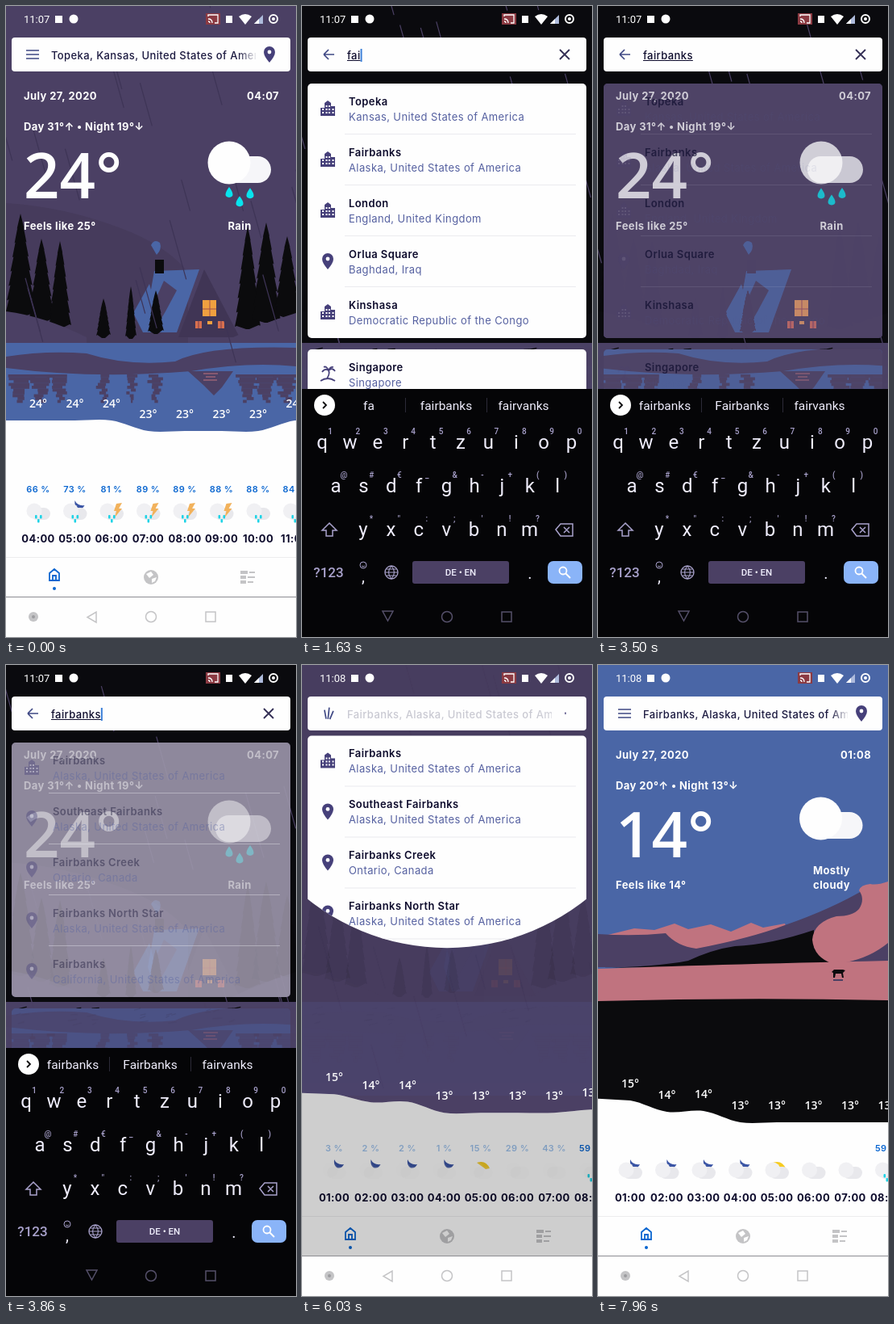
These frames come from a looping animation (360x781 px, 8000 ms). An HTML page with a canvas:

```html
<!DOCTYPE html>
<html lang="en">
<head>
<meta charset="utf-8">
<title>Weather search</title>
<style>
html, body { margin: 0; width: 100%; height: 100%; overflow: hidden; background: #4b4064; }
canvas { display: block; }
</style>
</head>
<body>
<canvas width="360" height="781"></canvas>
<script>
const c = document.querySelector('canvas').getContext('2d');
const PURPLE = '#4b4064', BLUE = '#4a66a6', PINK = '#c0737f', BLACK = '#0b0b0d', WHITE = '#fefefe';
const INK = '#0d0b2c', ICON = '#46407a', GREY = '#c4c4c6', ACCENT = '#0a66d0';
const LOOP = 8000, WORD = 'fairbanks', USA = 'United States of America';

const sat = v => Math.max(0, Math.min(1, v));
const ramp = (t, start, length) => sat((t - start) / length);
const smooth = p => p * p * (3 - 2 * p);
const mix = (a, b, p) => a + (b - a) * p;
const random = i => { const v = Math.sin(i * 91.7 + 3.1) * 43758.5; return v - Math.floor(v); };

function text(s, x, y, size = 13, color = WHITE, weight = 400, align = 'left', family = 'Inter') {
  c.font = `${weight} ${size}px ${family}, sans-serif`;
  c.letterSpacing = family === 'Inter' ? '0.4px' : '0px';
  c.textAlign = align;
  c.fillStyle = color;
  c.fillText(s, x, y + size * 0.36);
}
function box(x, y, w, h, color, r = 0) {
  c.fillStyle = color;
  c.beginPath();
  c.roundRect(x, y, w, h, r);
  c.fill();
}
function disc(x, y, r, color) {
  c.fillStyle = color;
  c.beginPath();
  c.arc(x, y, r, 0, 7);
  c.fill();
}
function shape(d, color) { c.fillStyle = color; c.fill(new Path2D(d)); }
function stroke(d, color, w = 1.5) { c.strokeStyle = color; c.lineWidth = w; c.stroke(new Path2D(d)); }
function ring(x, y, r, color, w = 1.5) {
  stroke(`M${x - r} ${y}a${r} ${r} 0 1 0 ${2 * r} 0a${r} ${r} 0 1 0 ${-2 * r} 0`, color, w);
}
function fade(alpha, draw) {
  if (alpha <= 0) return;
  c.save();
  c.globalAlpha *= alpha;
  draw();
  c.restore();
}
function at(x, y, scale, draw) {
  if (scale <= 0) return;
  c.save();
  c.translate(x, y);
  c.scale(scale, scale);
  draw();
  c.restore();
}

// Scenery
const trees = [[18, 257, 385, 19], [44, 288, 392, 16], [67, 291, 399, 14], [121, 362, 411, 9], [155, 347, 412, 7],
  [186, 352, 406, 10], [300, 273, 400, 16], [323, 268, 392, 18], [349, 285, 386, 16]];
function tree(x, top, base, half) {
  const steps = 7, side = [];
  for (let i = 1; i <= steps; i++) {
    const y = mix(top, base - 4, i / steps), w = half * (i / steps) ** 0.75;
    side.push([w, y], [w * 0.85, y - 1]);
  }
  const right = side.map(([w, y]) => `L${x + w} ${y}`).join('');
  const left = side.reverse().map(([w, y]) => `L${x - w} ${y + 1}`).join('');
  shape(`M${x} ${top}${right}L${x + 2} ${base}H${x - 2}${left}Z`, BLACK);
}
function lake() {
  box(0, 417, 360, 116, BLUE);
  shape('M0 434Q50 426 100 430Q150 446 210 440Q250 420 360 423V446Q300 440 230 452Q110 462 0 448Z', PURPLE);
  trees.forEach(([x, , , half], n) => {
    for (let i = 0; i < 10; i++) {
      const w = half * (1.9 - i * 0.16) * (0.6 + 0.5 * random(n * 10 + i));
      box(x - w / 2 + 8 * random(n + i * 7) - 4, 456 + i * 3.5, w, 3.8, PURPLE);
    }
  });
  shape('M226 452H282L268 472L258 482L246 470Z', PURPLE);
  stroke('M245 455H263M248 459H260M245 463H262', PINK, 1);
}
function cabinScene() {
  shape('M0 244Q70 248 140 274Q200 296 226 330V417H0Z', '#463b5c');
  shape('M184 328L240 326L212 404H186L176 374Z', BLUE);
  shape('M178 344L158 380L170 404H182L184 366Z', BLUE);
  shape('M196 340L212 352L198 378L184 402L180 376Z', PURPLE);
  shape('M180 296Q184 288 191 293Q194 301 187 308Z', BLUE);
  box(185, 314, 11, 17, BLACK);
  shape('M246 326L290 410H214Z', '#403555');
  box(244, 364, 17, 20, '#f0a040');
  stroke('M253 364V384M244 375H261', '#a0504c', 1);
  box(235, 390, 8, 9, '#d8704e');
  box(263, 390, 8, 9, '#d8704e');
  stroke('M239 390V399M267 390V399', '#7a3c50', 1);
  box(250, 390, 6, 4, '#f0a040');
  trees.forEach(tr => tree(...tr));
  shape('M0 378Q48 384 100 410V417H0ZM360 380Q320 392 280 411V417H360Z', PURPLE);
  lake();
}
function duneScene() {
  box(0, 0, 360, 600, BLUE);
  shape('M0 337L45 326L70 328L95 320L112 327L140 321L165 330L190 319L205 325L232 320L250 372H0Z', PINK);
  shape('M0 333Q45 336 84 332Q98 348 122 351Q190 338 232 322Q290 302 334 276V374H0Z', PURPLE);
  shape('M0 375Q70 374 112 366Q142 352 170 348Q215 346 268 328V350L292 372Z', BLACK);
  shape('M360 268Q346 273 338 271Q326 272 324 279Q332 290 324 302Q316 311 296 311Q268 318 266 340Q268 362 292 370H360Z', PINK);
  shape('M308 368Q338 362 360 344V368Z', PURPLE);
  shape('M0 376Q130 371 360 366V420H0Z', PINK);
  shape('M0 416Q180 411 360 415V600H0Z', BLACK);
  shape('M290 380L293 377H304L307 378L304 381L305 387H303L302 382H295L294 387H292V381Z', BLACK);
  stroke('M292 390H304', PURPLE, 2);
}
function rain(t, color) {
  for (let i = 0; i < 26; i++) {
    const length = 35 + 50 * random(i + 50);
    const y = (random(i) * 620 + t * (0.3 + 0.15 * random(i + 9))) % 620 - 100;
    const x = random(i + 90) * 440 - 110 + y * 0.28;
    stroke(`M${x} ${y}l${length * 0.28} ${length}`, color, 1.2);
  }
}

// Current weather
function bigCloud(x, y) {
  box(x - 17, y - 8, 69, 33, '#f6f6f9', 16.5);
  disc(x, y, 26.5, WHITE);
}
function header(t, arrived) {
  const bold = (s, x, y, align) => text(s, x, y, 13, WHITE, 700, align);
  bold('July 27, 2020', 22, 111);
  bold(arrived ? '01:08' : '04:07', 339, 111, 'right');
  bold(arrived ? 'Day 20°↑ • Night 13°↓' : 'Day 31°↑ • Night 19°↓', 22, 149);
  text(arrived ? '14°' : '24°', 22, 210, 78, WHITE, 600, 'left', 'Open Sans');
  bold(arrived ? 'Feels like 14°' : 'Feels like 25°', 22, 272);
  const sway = Math.sin(t / 900);
  if (arrived) {
    bigCloud(276 + sway, 190);
    bold('Mostly', 290, 254, 'center');
    bold('cloudy', 290, 272, 'center');
  } else {
    bigCloud(277, 194);
    [[277, 231], [303, 231], [290, 241]].forEach(([x, y], i) => {
      const dy = y + 1.5 * Math.sin(t / 250 + i);
      shape(`M${x} ${dy - 7}Q${x + 9} ${dy + 5} ${x} ${dy + 6}Q${x - 9} ${dy + 5} ${x} ${dy - 7}Z`, '#08e4ee');
    });
    bold('Rain', 290, 272, 'center');
  }
}

// Hourly forecast
const before = {
  hour: 4, temps: [24, 24, 24, 23, 23, 23, 23, 24], y: [492, 492, 492, 505, 505, 505, 505, 492],
  chance: [66, 73, 81, 89, 89, 88, 88, 84], kind: 'rmttttrt'
};
const after = {
  hour: 1, temps: [15, 14, 14, 13, 13, 13, 13, 13], y: [518, 532, 531, 545, 545, 545, 545, 545],
  chance: [3, 2, 2, 1, 15, 29, 43, 59], kind: 'nnnnsccr'
};
function hourIcon(x, kind, cloudAlpha) {
  if ('mn'.includes(kind)) shape(`M${x} 612Q${x + 3} 619 ${x + 12} 618Q${x + 9} 624 ${x + 3} 622Q${x - 1} 619 ${x} 612Z`, '#3b55a5');
  if (kind === 's') shape(`M${x - 5} 616Q${x + 6} 612 ${x + 11} 623L${x + 6} 624Z`, '#f6cc23');
  fade(cloudAlpha, () => {
    box(x - 9, 621, 24, 15, '#e8e8ec', 7.5);
    disc(x - 5, 625, 9.5, '#f0f0f3');
  });
  if (kind === 't') shape(`M${x + 6} 616L${x + 13} 615L${x + 9} 622H${x + 13}L${x + 4} 633L${x + 6} 625H${x + 3}Z`, '#f2b25c');
  if ('rmt'.includes(kind)) [[-4, 632], [2, 632], [-1, 637]].forEach(([dx, y]) => box(x + dx, y - 2, 2.6, 4.5, '#1fd3e6', 1));
}
function forecast(t) {
  const arrived = t > 5750, data = arrived ? after : before, p = smooth(ramp(t, 5730, 470));
  const ys = before.y.map((y, i) => mix(y, after.y[i], p));
  const col = i => 40 + 45.5 * i;
  const edge = i => ys[Math.max(0, Math.min(7, i))] + 21;
  const slope = i => (edge(i + 1) - edge(i - 1)) / 6;
  let d = `M0 ${edge(0) - slope(0)}L40 ${edge(0)}`;
  for (let i = 1; i < 8; i++) {
    d += `C${col(i - 1) + 15} ${edge(i - 1) + slope(i - 1)} ${col(i) - 15} ${edge(i) - slope(i)} ${col(i)} ${edge(i)}`;
  }
  const sheet = new Path2D(d + 'H360V731H0Z');
  c.fillStyle = WHITE;
  c.fill(sheet);
  ys.forEach((y, i) => {
    const x = col(i), chance = data.chance[i];
    text(data.temps[i] + '°', x, y, 14, WHITE, 600, 'center', 'Open Sans');
    fade(chance < 50 ? 1 - ramp(t, 5850, 300) : 1, () => text(chance + ' %', x, 598, 11, ACCENT, 600, 'center'));
    hourIcon(x, data.kind[i], arrived ? ramp(t, 5990, 300) : 1);
    text(String(data.hour + i).padStart(2, '0') + ':00', x, 659, 13, INK, 700, 'center');
  });
  box(0, 682, 360, 1, '#ececee');
  stroke('M54 711V702L60 697L66 702V711ZM58 711V705H62V711', ACCENT, 1.8);
  disc(60, 721, 2, ACCENT);
  disc(180, 707, 9, GREY);
  shape('M174 703L180 700L183 704L178 708ZM181 709L187 707L185 712L181 714Z', WHITE);
  [[291, 699, 9, 4], [302, 700, 7, 2], [291, 705, 7, 4], [300, 706, 9, 2], [291, 711, 7, 4], [300, 712, 7, 2]].forEach(r => box(...r, GREY));
  return sheet;
}

// Search results
const recent = [['city', 'Topeka', 'Kansas, ' + USA], ['city', 'Fairbanks', 'Alaska, ' + USA],
  ['city', 'London', 'England, United Kingdom'], ['pin', 'Orlua Square', 'Baghdad, Iraq'],
  ['city', 'Kinshasa', 'Democratic Republic of the Congo']];
const suggested = [['palm', 'Singapore', 'Singapore'], ['city', 'Copenhagen', 'Denmark']];
const found = [['city', 'Fairbanks', 'Alaska, ' + USA], ['pin', 'Southeast Fairbanks', 'Alaska, ' + USA],
  ['pin', 'Fairbanks Creek', 'Ontario, Canada'], ['pin', 'Fairbanks North Star', 'Alaska, ' + USA],
  ['pin', 'Fairbanks', 'California, ' + USA]];
const icons = {
  pin() {
    shape('M0 10Q-7 2 -7 -3A7 7 0 0 1 7 -3Q7 2 0 10Z', ICON);
    disc(0, -3, 2.4, WHITE);
  },
  city() {
    shape('M-9 9V-1H-4V-7L0 -10L4 -7V-3H9V9Z', ICON);
    for (const x of [-7, -2.5, 1, 5.5]) for (const y of [-4, 0, 4]) if (Math.abs(x) < 4 || y >= 0) box(x, y, 2, 2, WHITE);
  },
  palm() {
    stroke('M-9 8Q0 2 9 8M-1 5Q3 -1 1 -5M1 -5Q-4 -8 -7 -3M1 -5Q6 -9 9 -4M1 -5Q-2 -11 -5 -9M1 -5Q3 -10 7 -9', ICON, 1.8);
  }
};
function rows(list, top, detail = 1) {
  list.forEach(([icon, title, sub], i) => {
    const y = top + 63 * i;
    text(title, 58, y + 22, 13, INK, 600);
    fade(detail, () => {
      at(32, y + 31, 1, icons[icon]);
      text(sub, 58, y + 41, 13, '#5560a0');
      if (i < list.length - 1) box(53, y + 62, 287, 1, '#ebebef');
    });
  });
}
const card = (y, h) => box(7, y, 346, h, WHITE, 5);
function cardWindows(t) {
  c.save();
  c.beginPath();
  c.roundRect(7, 96, 346, 315, 5);
  c.roundRect(7, 425, 346, 140, 5);
  c.clip();
  fade(ramp(t, 3360, 143) * (1 - ramp(t, 3760, 250)), () => {
    box(0, 0, 360, 600, PURPLE);
    cabinScene();
    c.globalCompositeOperation = 'lighten';
    box(0, 0, 360, 600, PURPLE);
    c.globalCompositeOperation = 'source-over';
    fade(0.25, () => box(0, 0, 360, 600, PURPLE));
    fade(0.75, () => header(t, false));
  });
  c.restore();
}
function results(t, open) {
  if (open <= 0) return;
  const top = 96 - 15 * (1 - open);
  const gone = ramp(t, 3440, 200), arriving = ramp(t, 3760, 250);
  c.save();
  c.beginPath();
  c.arc(180, 72, open * 650, 0, 7);
  c.clip();
  cardWindows(t);
  fade(1 - ramp(t, 3360, 143), () => { card(top, 315); card(top + 329, 140); });
  fade(1 - gone, () => {
    const detail = sat(1 - gone * 2.8);
    rows(recent, top, detail);
    rows(suggested, top + 329, detail);
  });
  fade(arriving, () => { card(top, 315); rows(found, top); });
  c.restore();
}

// Search bar
const typedCount = t => Math.max(0, Math.min(WORD.length, Math.floor((t - 1250) / 160) + 1));
function searchBar(t, open) {
  box(7, 39, 346, 42, WHITE, 4);
  const m = Math.min(1, open * 1.25), count = typedCount(t);
  at(33, 60, 1, () => {
    c.rotate((m - 1) * Math.PI);
    let d = `M${mix(-8, -6, m)} 0H${mix(8, 7, m)}`;
    for (const s of [-1, 1]) d += `M${mix(-8, -6, m)} ${s * mix(5, 0, m)}L${mix(8, 0, m)} ${s * mix(5, 6, m)}`;
    stroke(d, '#3f4884', 1.7);
  });
  fade(1 - open * 1.8, () => {
    c.save();
    c.beginPath();
    c.rect(50, 40, 260, 40);
    c.clip();
    text((t > 5700 ? 'Fairbanks, Alaska, ' : 'Topeka, Kansas, ') + USA, 56, 61, 13, '#1c1a40', 500);
    const g = c.createLinearGradient(288, 0, 312, 0);
    g.addColorStop(0, 'rgba(254,254,254,0)');
    g.addColorStop(1, WHITE);
    box(288, 42, 24, 36, g);
    c.restore();
  });
  at(327, 60, 1 - 2 * open, icons.pin);
  at(326, 60, 2 * open - 1, () => {
    if (count) stroke('M-6 -6L6 6M6 -6L-6 6', '#332e55', 1.8);
    else { ring(-2, -2, 4.5, ICON, 1.8); stroke('M1.5 1.5L7 7', ICON, 2); }
  });
  if (open < 0.5) return;
  fade(2 * open - 1, () => {
    let end = 57;
    if (count) {
      const typed = WORD.slice(0, count);
      text(typed, 56, 61, 13, INK, 500);
      end = 56 + c.measureText(typed).width;
      box(56, 67, end - 56, 1, INK);
    } else {
      text('Search for a new place…', 57, 61, 13, '#a2a2aa');
    }
    const since = t - (count ? 2530 : 700);
    if (since < 0 || since % 1000 < 500) box(end, 53, 2, 16, '#3b7fd8');
  });
}

// Keyboard
const KEY = '#efedfc', HINT = '#a9a2cc';
const keyRows = [['qwertzuiop', '1234567890', 25, 539], ['asdfghjkl', '@#€_&-+()', 42, 593], ['yxcvbnm', '*":;\'!?', 76, 647]];
function keyboard(t, up) {
  if (up <= 0) return;
  const label = (s, x, y, size, color = KEY, weight = 400) => text(s, x, y, size, color, weight, 'center', 'Roboto');
  c.save();
  c.translate(0, 307 * (1 - up));
  box(0, 474, 360, 307, '#050507');
  disc(28, 494, 13, WHITE);
  const count = typedCount(t);
  stroke(count ? 'M26 490L30 494L26 498' : 'M30 490L26 494L30 498', BLACK, 1.8);
  if (count) {
    const words = [WORD.slice(0, Math.max(1, typedCount(t - 170))), count < 9 ? WORD : 'Fairbanks', 'fairvanks'];
    words.forEach((w, i) => label(w, [83, 179, 275][i], 494, 15.5));
    box(128, 485, 1, 18, '#2c2a38');
    box(229, 485, 1, 18, '#2c2a38');
  } else {
    stroke('M74 488V500M71 488H77M71 500H77M69 491L66 494L69 497M79 491L82 494L79 497', HINT);
    ring(124, 494, 4.5, HINT, 3.5);
    for (let i = 0; i < 8; i++) {
      const a = i * Math.PI / 4;
      disc(124 + 7 * Math.cos(a), 494 + 7 * Math.sin(a), 1.5, HINT);
    }
    box(168, 487, 14, 14, HINT, 1);
    stroke('M223 500H218V488H231V494M225 493L230 498L227 501', HINT, 2);
    [281, 286, 291].forEach(x => disc(x, 494, 1.6, HINT));
  }
  keyRows.forEach(([keys, hints, x0, y]) => [...keys].forEach((k, i) => {
    const x = x0 + 34.4 * i;
    label(k, x, y, 24);
    label(hints[i], x + 10, y - 13, 10, HINT, 500);
  }));
  stroke('M34 640L43 649H38V656H30V649H25ZM315 648L321 641H336V656H321ZM325 645L332 652M332 645L325 652', HINT);
  label('?123', 33, 701, 17, HINT, 500);
  label(',', 76, 706, 20);
  ring(76, 692, 4, HINT, 1);
  stroke('M74 693Q76 695 78 693', HINT, 1);
  ring(111, 701, 8, HINT, 1.3);
  stroke('M103 701H119M104.5 697H117.500M104.5 705H117.500M111 693Q104 701 111 709Q118 701 111 693', HINT, 1.1);
  box(137, 687, 120, 28, PURPLE, 3);
  label('DE • EN', 197, 701, 11.5, KEY, 500);
  label('.', 283, 702, 20);
  box(305, 687, 43, 28, '#8ab4f8', 7);
  ring(324, 699, 4.5, WHITE, 1.8);
  stroke('M327.500 702.500L333 708', WHITE, 2);
  c.restore();
}
function navigation(dark) {
  const color = dark ? '#55506a' : GREY;
  box(0, 731, 360, 50, dark ? '#050507' : WHITE);
  if (!dark) {
    box(0, 731, 360, 1, '#8d8d92');
    disc(34, 756, 6, GREY);
    disc(34, 756, 2, '#9c9ca0');
  }
  stroke(dark ? 'M100 749H113L106.500 761Z' : 'M112 750V763L101 756.500Z', color);
  ring(180, 756, 6.5, color);
  c.strokeStyle = color;
  c.strokeRect(248, 750, 12, 12);
}
function statusBar(t) {
  text(t > 5400 ? '11:08' : '11:07', 22, 16, 13, WHITE, 400, 'left', 'Roboto');
  box(61, 12, 9, 9, WHITE);
  disc(84, 16, 5.5, WHITE);
  box(248, 9, 18, 14, '#8b3a42');
  stroke('M251 13V11H263V21H259M251 16Q256 16 256 21M251 19Q253 19 253 21', WHITE, 1.3);
  box(273, 12, 8, 9, WHITE);
  shape('M289 13Q297 7 305 13L297 23Z', WHITE);
  shape('M308 22L319 11V22Z', '#aebbdc');
  shape('M308 22L314 16V22Z', WHITE);
  ring(332, 16, 5, WHITE, 2);
  disc(332, 16, 2, WHITE);
}

function dimBehind(dim, sheet) {
  c.save();
  const sky = new Path2D();
  sky.rect(0, 0, 360, 417);
  c.globalAlpha = 0.97 * dim * dim;
  c.fillStyle = '#09090c';
  c.fill(sky);
  c.fillStyle = PURPLE;
  c.fillRect(0, 417, 360, 100);
  c.globalAlpha = 0.86 * dim;
  c.fillStyle = '#000';
  c.fill(sheet);
  c.restore();
}

function frame(now) {
  const t = now % LOOP;
  const open = t < 3000 ? ramp(t, 460, 500) : 1 - ramp(t, 5745, 500);
  const dim = open ** 1.8;
  const up = t < 3000 ? 1 - (1 - ramp(t, 520, 445)) ** 3 : 1 - ramp(t, 5350, 300) ** 2;
  const cabinAlpha = 1 - ramp(t, 5750, 310);
  box(0, 0, 360, 781, PURPLE);
  fade(cabinAlpha, () => { cabinScene(); rain(t, '#3e3456'); });
  fade(ramp(t, 6200, 420), duneScene);
  header(t, t > 5950);
  const sheet = forecast(t);
  if (dim > 0) {
    dimBehind(dim, sheet);
    fade(dim * cabinAlpha, () => {
      rain(t, PURPLE);
      for (let i = 0; i < 30; i++) {
        const x = [8, 75, 100, 155, 190, 245, 270][i % 7] + 16 * random(i);
        const y = 424 + 24 * random(i + 30);
        stroke(`M${x} ${y}l${4 + 8 * random(i + 60)} ${-3 * random(i + 80)}`, BLACK, 1.3);
      }
    });
  }
  results(t, open);
  searchBar(t, open);
  keyboard(t, up);
  navigation(up > 0);
  statusBar(t);
  requestAnimationFrame(frame);
}
requestAnimationFrame(frame);
</script>
</body>
</html>
```
